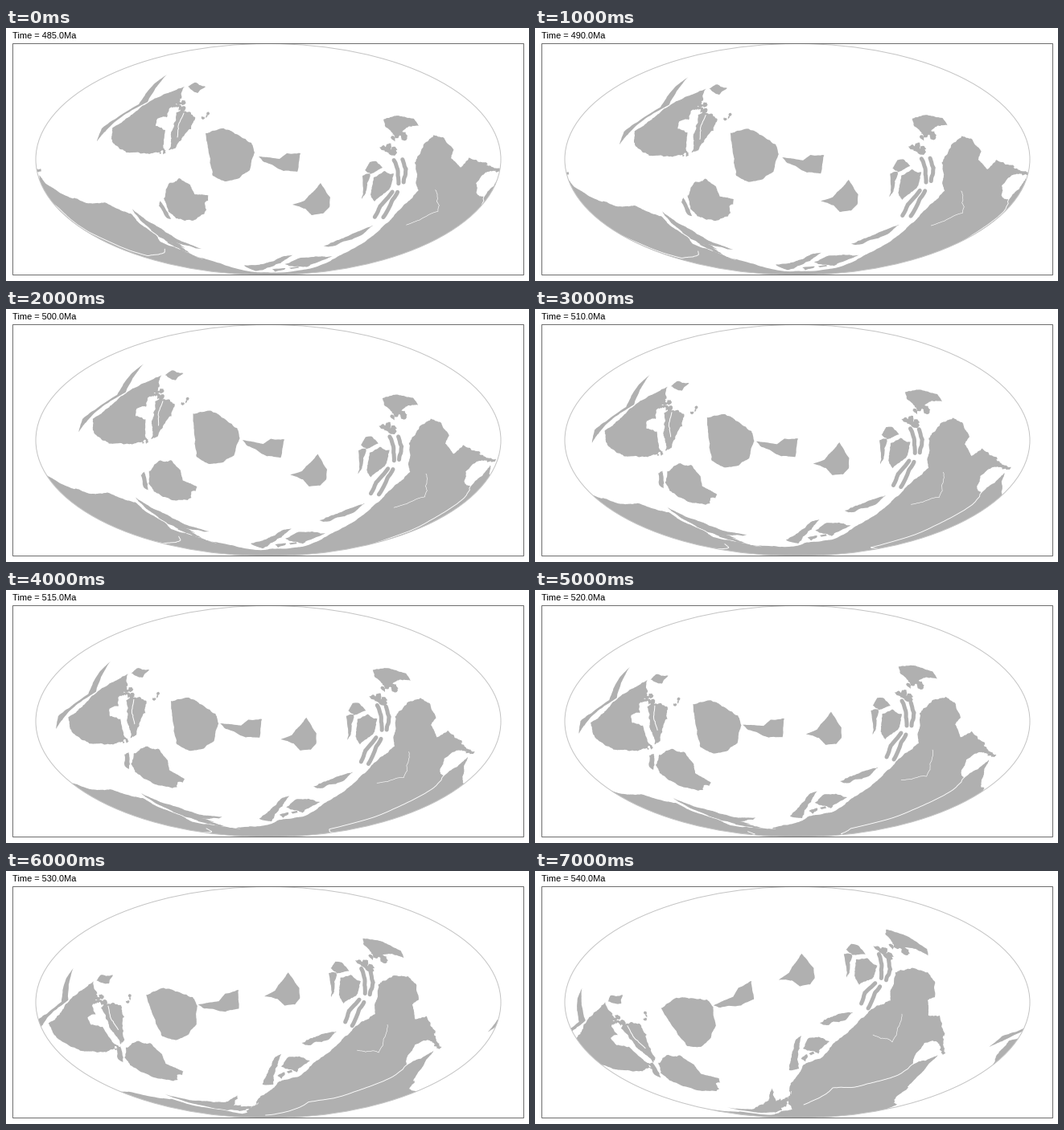
Animation of 650x315 px, one loop 8000 ms. Source, as a matplotlib script:

```python
import numpy as np
import matplotlib.pyplot as plt
from matplotlib.animation import FuncAnimation
from matplotlib.patches import Ellipse, PathPatch, Rectangle
from matplotlib.path import Path

W, H, DPI = 650, 315, 100
CX, CY, A, B = 326, 163.5, 289, 144
PX = 72 / DPI
LAND = "#b0b0b0"
AGES = [485, 490, 500, 510, 515, 520, 530, 540]
rng = np.random.default_rng(4)

# Mollweide: auxiliary angle against the sine of latitude
THETA = np.linspace(-np.pi / 2, np.pi / 2, 20001)
SIN_LAT = (2 * THETA + np.sin(2 * THETA)) / np.pi


def unit(v):
    return v / np.linalg.norm(v, axis=-1, keepdims=True)


def to_sphere(pts):
    x, y = np.array(pts, float).T
    s = np.clip((CY - y) / B, -0.9999, 0.9999)
    lon = (x - CX) / (A * np.sqrt(1 - s * s)) * np.pi
    z = np.interp(np.arcsin(s), THETA, SIN_LAT)
    r = np.sqrt(1 - z * z)
    return np.stack([r * np.cos(lon), r * np.sin(lon), z], axis=1)


def project(v, closed):
    lon = np.unwrap(np.arctan2(v[:, 1], v[:, 0]))
    th = np.interp(v[:, 2], SIN_LAT, THETA)
    if closed and abs(lon[-1] - lon[0]) > np.pi:
        # ring around the south pole: close it along a meridian
        down = np.linspace(th[-1], -np.pi / 2, 60)
        th = np.concatenate([th, down, down[::-1]])
        lon = np.concatenate([lon, np.full(60, lon[-1]), np.full(60, lon[0])])
    verts, codes = [], []
    for shift in (-2 * np.pi, 0, 2 * np.pi):
        x = CX + A * np.cos(th) * (lon + shift) / np.pi
        verts.append(np.stack([x, CY - B * np.sin(th)], axis=1))
        codes += [Path.MOVETO] + [Path.LINETO] * (len(x) - 1)
    return Path(np.vstack(verts), codes)


def fit(src, dst):
    """Best rigid rotation taking one set of points to another."""
    u, _, vt = np.linalg.svd(src.T @ dst)
    d = np.sign(np.linalg.det(u @ vt))
    return vt.T @ np.diag([1, 1, d]) @ u.T


def partial(rot, share):
    """The same turn, carried out only in part."""
    angle = np.arccos(np.clip((np.trace(rot) - 1) / 2, -1, 1))
    if angle < 1e-6:
        return np.eye(3)
    k = (rot - rot.T) / (2 * np.sin(angle))
    a = angle * share
    return np.eye(3) + np.sin(a) * k + (1 - np.cos(a)) * k @ k


# The whole globe turns together: four landmarks at four ages
TURN_AGES = [485, 500, 520, 540]
LANDMARKS = [to_sphere(p) for p in (
    [(524, 134), (450, 250), (348, 286), (40, 186)],
    [(517, 137), (440, 246), (350, 275), (602, 196)],
    [(497, 130), (422, 224), (347, 252), (565, 213)],
    [(471, 121), (396, 177), (329, 205), (501, 229)])]


def wander(age):
    k = np.interp(age, TURN_AGES, range(4))
    i = min(int(k), 2)
    step = fit(LANDMARKS[i], LANDMARKS[i + 1])
    return partial(step, k - i) @ fit(LANDMARKS[0], LANDMARKS[i])


def fray(v, rough):
    """Midpoint displacement gives a ragged coast."""
    while True:
        gap = np.linalg.norm(np.diff(v, axis=0), axis=1, keepdims=True)
        if gap.max() < 0.03:
            return v
        mid = (v[:-1] + v[1:]) / 2
        mid += rng.normal(0, rough, mid.shape) * np.minimum(gap, 0.12)
        both = np.empty((2 * len(v) - 1, 3))
        both[::2], both[1::2] = v, unit(mid)
        v = both


class Plate:
    """Rigid plate riding on the common turn, plus its own easing drift."""

    def __init__(self, first=None, last=None):
        self.parts = []
        self.drift = np.eye(3)
        if first:
            self.drift = wander(540).T @ fit(to_sphere(first), to_sphere(last))

    def rotation(self, age):
        share = np.sin(np.pi / 2 * (age - 485) / 55)
        return wander(age) @ partial(self.drift, share)

    def add(self, *runs, rough=0.07, line=0, color=LAND):
        """Each run is (age, points as seen at that age)."""
        v = np.vstack([to_sphere(p) @ self.rotation(age) for age, p in runs])
        if not line:
            v = np.vstack([v, v[:1]])
        self.parts.append((fray(v, rough), line, color))

    def specks(self, age, start, end, n, spread, size):
        """Scatter small islands along a line."""
        spin = np.linspace(0, 2 * np.pi, 7)[:-1]
        for _ in range(n):
            mid = np.array(start) + rng.random() * np.subtract(end, start)
            mid = mid + rng.normal(0, spread, 2)
            r = size * rng.uniform(0.4, 1.4, 6)
            self.add((age, mid + np.stack([r * np.cos(spin),
                                           r * np.sin(spin)], axis=1)))


laurentia = Plate([(222, 73), (200, 58), (190, 157), (237, 75)],
                  [(88, 163), (57, 149), (141, 246), (103, 159)])
laurentia.add((485, [
    (222, 73), (214, 92), (203, 100), (200, 111), (188, 113), (186, 122),
    (198, 127), (196, 152), (178, 157), (160, 155), (142, 151), (131, 138),
    (132, 125), (165, 101), (190, 86)]))
laurentia.add((485, [(212, 105), (230, 106), (235, 113), (230, 126),
                     (210, 150), (202, 152), (206, 128)]), rough=0.12)
laurentia.add((485, [(113, 141), (119, 125), (165, 95), (182, 72), (200, 58),
                     (176, 92), (130, 122)]), rough=0.03)
laurentia.add((485, [(226, 73), (234, 68), (248, 73), (238, 81)]))
laurentia.add((485, [(221, 106), (214, 122), (213, 136)]), line=1, color="white")
laurentia.specks(485, (212, 88), (227, 100), 12, 4, 3.2)
laurentia.specks(485, (191, 154), (208, 152), 4, 1.5, 2)
laurentia.specks(485, (239, 114), (252, 108), 4, 1, 2)

baltica = Plate([(268, 125), (272, 191), (248, 132), (309, 154)],
                [(178, 157), (205, 216), (154, 175), (220, 170)])
baltica.add((485, [
    (248, 131), (268, 125), (290, 134), (305, 143), (309, 155), (303, 177),
    (290, 187), (272, 191), (257, 184), (254, 163)]), rough=0.05)

isle = Plate([(315, 161), (365, 156), (362, 179)],
             [(224, 168), (269, 139), (270, 158)])
isle.add((485, [(314, 160), (340, 163), (349, 156), (366, 156), (362, 179),
                (345, 178), (321, 167)]), rough=0.03)

cape = Plate([(391, 193), (356, 218), (403, 220)],
             [(333, 102), (302, 135), (347, 130)])
cape.add((485, [(391, 193), (403, 211), (402, 223), (394, 231), (380, 233),
                (372, 225), (356, 220), (371, 215)]), rough=0.03)

siberia = Plate([(215, 193), (259, 212), (255, 242)],
                [(180, 234), (239, 262), (240, 284)])
siberia.add((520, [
    (154, 205), (172, 198), (186, 202), (197, 216), (199, 228), (219, 240),
    (210, 243), (209, 249), (180, 244), (155, 228), (150, 218)]))
siberia.add((520, [(142, 206), (148, 204), (147, 224), (142, 220)]))

north = Plate([(469, 114), (513, 122)], [(437, 73), (488, 105)])
north.add((485, [(469, 114), (487, 109), (507, 113), (513, 122), (497, 125),
                 (486, 137), (471, 122)]))
north.specks(485, (462, 140), (482, 155), 8, 2, 4)
north.specks(485, (478, 133), (499, 133), 7, 2, 4)

terranes = Plate([(450, 168), (458, 215), (482, 181)],
                 [(392, 92), (402, 141), (425, 116)])
terranes.add((485, [(443, 184), (452, 181), (447, 206), (442, 213)]))
terranes.add((485, [(446, 177), (452, 167), (460, 166), (468, 174), (453, 182)]))
terranes.add((485, [(457, 186), (470, 178), (482, 181), (475, 202), (458, 216),
                    (453, 208)]))
for ribbon in ([(437, 208), (442, 194), (455, 178)],
               [(446, 211), (455, 190), (461, 180)],
               [(456, 138), (461, 152), (462, 169)],
               [(467, 140), (471, 153), (468, 169)]):
    terranes.add((520, ribbon), rough=0.03, line=5)

gondwana = Plate()
gondwana.add(
    (540, [
        (318, 288), (318, 264), (334, 241), (358, 231), (372, 214), (398, 192),
        (418, 172), (442, 161), (442, 148), (448, 126), (471, 121), (488, 126),
        (497, 138), (497, 157), (488, 161), (489, 180), (503, 180), (507, 205),
        (508, 227), (499, 212), (484, 214), (472, 230), (469, 241), (501, 229)]),
    (485, [(48, 192), (75, 209), (100, 218), (125, 218), (145, 228)]),
    (520, [(175, 265), (200, 277), (225, 285), (243, 293), (270, 296),
           (300, 297)]))
gondwana.add((485, [(157, 225), (185, 245), (215, 264), (243, 275),
                    (190, 260)]))
gondwana.add((540, [(316, 248), (319, 228), (325, 209), (331, 205), (327, 230),
                    (328, 246)]))
gondwana.add((540, [(333, 221), (340, 208), (358, 208), (366, 212), (350, 224)]))
gondwana.add((540, [(354, 189), (375, 179), (395, 176), (385, 186),
                    (362, 192)]))
gondwana.specks(540, (302, 292), (315, 284), 6, 3, 4)
gondwana.specks(540, (497, 180), (507, 226), 10, 2, 3)
gondwana.specks(540, (322, 240), (352, 222), 6, 3, 3)
gondwana.add((540, [(470, 240), (455, 252), (425, 262), (370, 270), (334, 291)]),
             rough=0.04, line=0.9, color="white")
gondwana.add((540, [(456, 178), (444, 213), (420, 204)]),
             rough=0.06, line=0.6, color="white")

PLATES = [laurentia, baltica, isle, cape, siberia, north, terranes, gondwana]

fig = plt.figure(figsize=(W / DPI, H / DPI), dpi=DPI, facecolor="white")
ax = fig.add_axes([0, 0, 1, 1])
ax.set(xlim=(0, W), ylim=(H, 0))
ax.axis("off")
globe = Ellipse((CX, CY), 2 * A, 2 * B, fc="none", ec="#c4c4c4", lw=PX, zorder=3)
ax.add_patch(globe)
ax.add_patch(Rectangle((8.5, 19.5), 635, 288, fc="none", ec="#6e6e6e",
                       lw=PX, snap=False, zorder=4))
title = ax.text(8, 13, "", family="Liberation Sans", size=11 * PX,
                va="baseline", color="black")

drawn = []
for plate in PLATES:
    for v, line, color in plate.parts:
        style = (dict(fc="none", ec=color, lw=line * PX, capstyle="round")
                 if line else dict(fc=color, ec="none"))
        patch = ax.add_patch(PathPatch(Path([(0, 0), (0, 0)]), zorder=2, **style))
        patch.set_clip_path(globe)
        drawn.append((patch, plate, v, not line))


def draw(i):
    title.set_text(f"Time = {AGES[i]:.1f}Ma")
    turns = {p: p.rotation(AGES[i]) for p in PLATES}
    for patch, plate, v, closed in drawn:
        patch.set_path(project(v @ turns[plate].T, closed))
    return [title] + [d[0] for d in drawn]


anim = FuncAnimation(fig, draw, frames=len(AGES), interval=1000,
                     repeat=True, repeat_delay=0)
plt.show()
```
